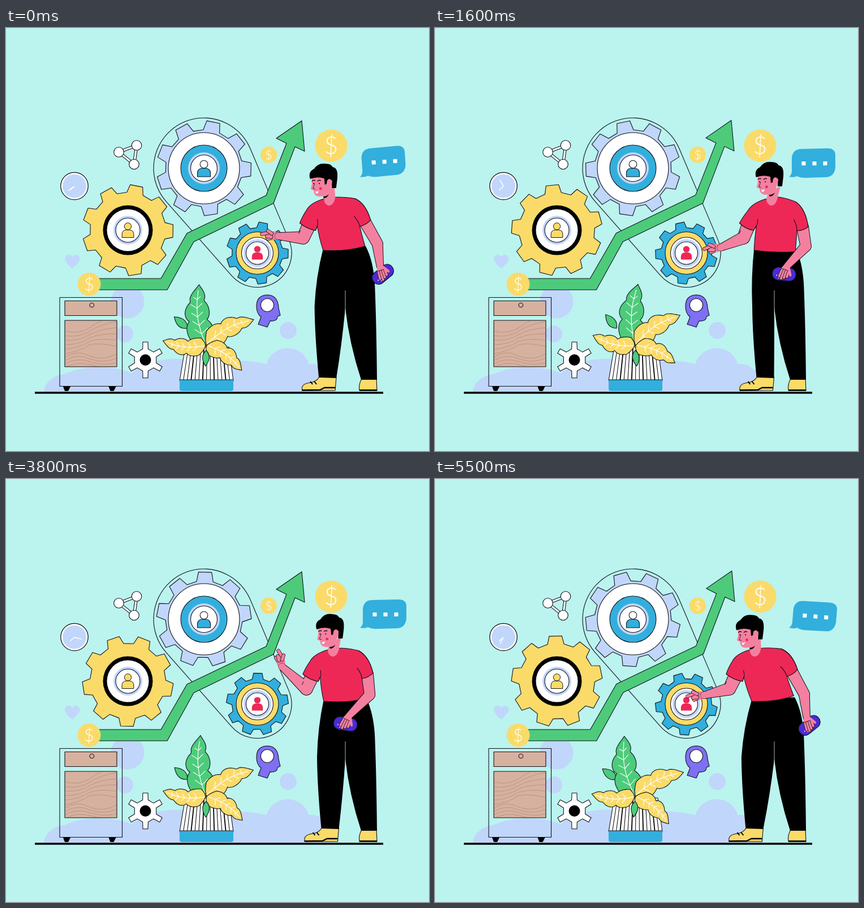
An HTML page with a canvas that plays this animation: 748 px wide and 748 px high, repeating every 5.6 s.

```html
<!DOCTYPE html>
<html lang="en">
<head>
<meta charset="utf-8">
<title>Growth and gears</title>
<style>
html, body { margin: 0; width: 100%; height: 100%; overflow: hidden; background: #bbf3ef; }
canvas { display: block; width: 748px; height: 748px; }
</style>
</head>
<body>
<canvas id="stage" width="748" height="748"></canvas>
<script>
const ctx = document.getElementById('stage').getContext('2d');
const TAU = Math.PI * 2, DEG = Math.PI / 180, LOOP = 5600, STEP = 100, SPIN = .0605;
const BG = '#bbf3ef', INK = '#10131a', LILAC = '#c1d6fb', BLUE = '#32afdd', YELLOW = '#fadb69',
  GREEN = '#4dcb7b', RED = '#ee2856', SKIN = '#f4809f', WOOD = '#d7b19f', GRAIN = '#b48c7c',
  VIOLET = '#7f6ff3', BALL = '#4b2bd6';

// Motion rules
const swayAt = t => Math.sin((t - 430) / 1000);
const leanAt = t => 8 + 12 * swayAt(t) + 4 * Math.cos(TAU * (t - 1600) / 2800);
const plateau = (t, mid, width) => Math.exp(-(((t - mid) / width) ** 4));
const raiseAt = t => plateau(t, 366, 369) + plateau(t, 3684, 1520);

function paint(fill, stroke, width = 1.1) {
  if (fill) { ctx.fillStyle = fill; ctx.fill(); }
  if (stroke) { ctx.strokeStyle = stroke; ctx.lineWidth = width; ctx.stroke(); }
}
function disc(x, y, r, fill, stroke, width) {
  ctx.beginPath(); ctx.arc(x, y, r, 0, TAU); paint(fill, stroke, width);
}
function oval(x, y, rx, ry, fill) {
  ctx.beginPath(); ctx.ellipse(x, y, rx, ry, 0, 0, TAU); paint(fill);
}
function box(x, y, w, h, fill, stroke, r = 0) {
  ctx.beginPath(); ctx.roundRect(x, y, w, h, r); paint(fill, stroke);
}
// Each item is a point [x, y] or a curve [cx, cy, x, y].
function trace(items, map = (x, y) => [x, y], close = true) {
  ctx.beginPath();
  items.forEach((p, i) => {
    if (!i) ctx.moveTo(...map(p[0], p[1]));
    else if (p.length === 2) ctx.lineTo(...map(p[0], p[1]));
    else ctx.quadraticCurveTo(...map(p[0], p[1]), ...map(p[2], p[3]));
  });
  if (close) ctx.closePath();
}
function line(items, color, width, map) { trace(items, map, false); paint(null, color, width); }
function at(x, y, turn, scale, draw) {
  ctx.save(); ctx.translate(x, y); ctx.rotate(turn * DEG); ctx.scale(scale, scale); draw(); ctx.restore();
}
// Outline around two circles.
function hull(x1, y1, r1, x2, y2, r2) {
  const a = Math.atan2(y2 - y1, x2 - x1), b = Math.acos((r1 - r2) / Math.hypot(x2 - x1, y2 - y1));
  ctx.beginPath();
  ctx.arc(x1, y1, r1, a + b, a + TAU - b);
  ctx.arc(x2, y2, r2, a - b, a + b);
  ctx.closePath();
}
function limb(a, ra, b, rb, c, rc) {
  for (const [grow, color] of [[.6, INK], [-.4, SKIN]]) {
    hull(...a, ra + grow, ...b, rb + grow); paint(color);
    hull(...b, rb + grow, ...c, rc + grow); paint(color);
  }
}
function finger(pts, w = 5) { line(pts, INK, w + 1.5); line(pts, SKIN, w); }

function gear(x, y, r, root, teeth, turn, fill, top = 8, base = 12.5) {
  ctx.beginPath();
  for (let i = 0; i < teeth; i++) {
    for (const [off, rad] of [[-base, root], [-top, r], [top, r], [base, root]]) {
      const a = (turn + i * 360 / teeth + off) * DEG;
      ctx.lineTo(x + rad * Math.sin(a), y - rad * Math.cos(a));
    }
  }
  ctx.closePath(); paint(fill, INK);
}
function person(x, y, s, fill, head, stroke) {
  at(x, y, 0, s, () => {
    box(-11.5, 0, 23, 15, fill, stroke, [8, 8, 0, 0]);
    disc(0, -7, 6.8, head, stroke);
  });
}
function dollar(x, y, r) {
  disc(x, y, r, YELLOW);
  ctx.font = `300 ${r * 1.5}px Lato, "Open Sans", sans-serif`;
  ctx.fillStyle = '#fff'; ctx.textAlign = 'center';
  const m = ctx.measureText('$');
  ctx.fillText('$', x, y + (m.actualBoundingBoxAscent - m.actualBoundingBoxDescent) / 2);
}

function backdrop() {
  ctx.fillStyle = BG; ctx.fillRect(0, 0, 748, 748);
  disc(215, 484, 29.5, LILAC); disc(210, 541, 15, LILAC); disc(499, 535, 15, LILAC);
  disc(111, 408, 7, LILAC); disc(123.5, 408, 7, LILAC);
  trace([[105, 411], [117, 407], [130, 411], [126, 418, 117, 425], [108, 419, 105, 411]]); paint(LILAC);
  const hump = (x, rx, ry) => {
    ctx.beginPath(); ctx.ellipse(x, 644, rx, ry, 0, Math.PI, TAU); paint(LILAC);
  };
  hump(112, 45, 33); hump(165, 90, 44); hump(300, 95, 59); hump(405, 120, 56); hump(540, 40, 50);
  disc(498, 605, 39, LILAC);
  line([[51, 645], [667, 645]], '#000', 3.4);
}

function gears(t) {
  const turn = t * SPIN;
  hull(350, 248, 89, 444.5, 398, 60.5); paint(null, INK);

  gear(350, 248, 84, 68, 9, 11.5 + turn, LILAC);
  disc(350, 248, 63, '#fff', INK);
  disc(350, 248, 41, BLUE, INK);
  disc(350, 248, 28, LILAC);
  disc(350, 248, 23.5, '#fff', INK);
  person(350, 248, 1, BLUE, '#fff', INK);

  gear(215.5, 357.5, 80.5, 67, 9, 11 - turn, YELLOW);
  disc(215.5, 357.5, 44, '#000');
  disc(215.5, 357.5, 37, '#fff');
  disc(215.5, 357.5, 25.5, LILAC);
  disc(215.5, 357.5, 21.5, '#fff', INK);
  person(215.5, 357, .9, YELLOW, YELLOW, INK);

  gear(444.5, 398, 55, 45, 9, 11 + turn, BLUE);
  disc(444.5, 398, 37.5, YELLOW, INK);
  disc(444.5, 398, 28, '#fff', INK);
  disc(444.5, 398, 24.5, LILAC);
  disc(444.5, 398, 20, '#fff', INK);
  person(444.5, 397, .84, RED, RED);
}

function arrow(t) {
  const k = 1 + .0215 * Math.sin(Math.PI * t / 2000) ** 4;
  trace([[150, 443], [274, 443], [320, 363], [460, 296], [496, 204], [478, 195], [523, 164], [528, 218],
    [511, 210], [473, 310], [332, 378], [285, 463], [150, 463]],
  (x, y) => [165 + (x - 165) * k, y > 440 ? y : 453 + (y - 453) * k]);
  paint(GREEN, INK);
}

function icons(t) {
  dollar(147, 453, 20.5); dollar(464.5, 224, 14.5); dollar(575, 208, 28.5);

  const nodes = [[199.5, 219.5], [231, 207.5], [226.5, 241]];
  for (const [w, c] of [[5.4, INK], [3.2, '#fff']]) { trace(nodes); paint(null, c, w); }
  nodes.forEach(n => disc(...n, 8.8, '#fff', INK));

  disc(121, 279.5, 24.2, '#fff', INK, 1.3);
  disc(121, 279.5, 20.8, LILAC);
  const hand = (deg, len) => line([[121, 280],
    [121 + len * Math.sin(deg * DEG), 280 - len * Math.cos(deg * DEG)]], '#fff', 1.6);
  hand(230, 10); hand(235 + t * SPIN, 13);

  gear(246.5, 587, 32, 20, 6, 0, '#fff', 8, 14);
  disc(246.5, 587, 10, '#000');

  trace([[446, 524], [451, 511], [443, 505, 443, 492], [443, 472, 463, 472], [481, 473, 482, 495], [485, 508],
    [480, 510], [480, 519, 467, 518], [462, 529]]);
  paint(VIOLET, INK);
  disc(462, 490, 11.5, '#fff', INK);
}

function cabinet() {
  box(95, 476.5, 110.5, 157, null, INK);
  box(104, 482.5, 92, 26, WOOD, INK);
  disc(151.8, 490, 3.8, null, INK);
  box(104, 517, 92, 82, WOOD, INK);
  ctx.save();
  ctx.beginPath(); ctx.rect(105, 518, 90, 80); ctx.clip();
  for (let i = 0; i < 6; i++) {
    line([[104, 536 + i * 8], [130, 542 + i * 6, 148, 530 + i * 6], [166, 516 + i * 8, 196, 508 + i * 11]], GRAIN, .8);
    if (i < 4) line([[104, 582 + i * 6], [126, 568 + i * 7, 148, 580 + i * 5], [172, 590 + i * 4, 196, 576 + i * 8]], GRAIN, .8);
  }
  ctx.restore();
  for (const x of [101, 181.5]) {
    trace([[x, 634], [x + 13, 634], [x + 9, 642], [x + 3, 642]]); paint('#000');
  }
}

// A bowed leaf with three scalloped lobes, growing from (x, y).
function leaf(x, y, turn, len, w, fill) {
  const axis = u => -.085 * len * Math.sin(Math.PI * u);
  const half = u => w * (1 - u ** 4) * Math.sqrt(Math.min(1, u * 8)) *
    (.6 + .4 * Math.sqrt(Math.abs(Math.sin(Math.PI * u * (1.93 + 1.07 * u)))));
  at(x, y, turn, 1, () => {
    ctx.beginPath();
    for (let i = 0; i <= 80; i++) {
      const u = 1 - Math.abs(i - 40) / 40, s = i < 40 ? -1 : 1;
      const side = 1 - u;
      ctx.lineTo(axis(side) * 0 + axis(u) + s * half(u), -len * u);
    }
    ctx.closePath(); paint(fill, INK);
    ctx.beginPath();
    for (let u = .03; u < .92; u += .08) ctx.lineTo(axis(u), -len * u);
    paint(null, '#fff', 1.2);
    for (let u = .2; u < .8; u += .14) {
      const c = axis(u), y0 = -len * u, d = half(u) * .5;
      line([[c - d, y0 - d * .8], [c, y0], [c + d, y0 - d * .8]], '#fff', 1.1);
    }
  });
}
function sprout(x, y, turn, len, w) {
  at(x, y, turn, 1, () => {
    trace([[0, 0], [-w * 1.3, -len * .4, 0, -len], [w * 1.3, -len * .4, 0, 0]]);
    paint(GREEN, INK);
  });
}

function plant(t) {
  const sway = swayAt(t);
  trace([[317, 564], [394, 564], [402, 624], [307, 624]]); paint('#fff', INK);
  for (let i = 1; i < 14; i++) {
    line([[317 + i * 5.5, 565], [307 + i * 6.8, 622]], '#000', i % 3 ? 1 : 1.8);
  }
  box(307, 622, 95, 20, BLUE, null, [0, 0, 4, 4]);
  line([[307, 622], [402, 622]], INK, 1);
  sprout(321, 531, -46 + 8 * sway, 31, 11);
  leaf(354, 562, -3.7 + 6.9 * sway, 109, 24, GREEN);
  leaf(354, 560, 60.5 - 4 * sway, 95, 19, YELLOW);
  leaf(355, 561, 122 - 8.5 * sway, 76, 16, YELLOW);
  leaf(353, 562, -81 + 5.5 * sway, 76, 16, YELLOW);
  sprout(354, 570, 180 - 6 * sway, 28, 9);
}

function bubble(t) {
  let size = 1, turn = 0;
  if (t < 1862) turn = 10 * Math.sin(TAU * (t - 35) / 522);
  else if (t > 5019) turn = -10 * Math.sin(TAU * (t - 5019) / 522);
  if (t > 1900 && t < 3050) size = Math.max(0, 1 - (t - 1900) / 450);
  else if (t >= 3050 && t < 3600) size = .03 + .97 * (t - 3050) / 550;
  else if (t >= 3600 && t < 3800) size = 1 + .06 * Math.sin(Math.PI * (t - 3600) / 200);
  if (!size) return;
  at(628, 263, turn, size, () => {
    trace([[3, -34], [5, -49, 20, -49], [66, -50], [81, -50, 80, -36], [80, -16],
      [78, 0, 64, 1], [26, 2], [18, 2, 12, -1], [6, 2, -2, 0], [4, -4, 3, -14]]);
    paint(BLUE);
    ctx.fillStyle = '#fff';
    for (const x of [24, 43, 62]) ctx.fillRect(x - 3.5, -27, 7, 7);
  });
}

function trousers(lean, k) {
  const step = (x, y) => [x + k * Math.min(1, Math.max(0, (y - 390) / 80)), y];
  const shoe = (x, map) => {
    trace([[x + 31, 617], [x + 61, 617], [x + 59, 641], [x + 1, 641], [x - 2, 631, x + 10, 628],
      [x + 25, 627, x + 31, 617]], map);
    paint(YELLOW, INK);
  };
  shoe(526, step);
  line([[526, 640.5], [558, 640], [566, 636], [585, 636]], '#000', 2.4, step);
  for (const x of [541, 548]) line([[x, 625], [x + 4, 630]], '#000', 2, step);
  trace([[629, 620], [655, 620], [656, 641], [625, 641], [623, 631, 629, 620]]); paint(YELLOW, INK);
  line([[625, 640.5], [656, 640.5]], '#000', 2.6);

  trace([[561 + lean * .14, 390], [550 + k * .7, 440, 548.5 + k, 492], [549 + k, 545, 556 + k, 618],
    [587 + k, 619], [595 + k * .4, 560, 600, 495], [607, 558, 628, 622], [656, 622], [655, 520, 652, 450],
    [649, 410, 636, 386]]);
  paint('#000');
  line([[600, 464], [600, 508]], '#b9c4c6', .9);
}

function pointingArm(lean, raise, shoulder) {
  const elbow = [526 + lean * .85, 371], wrist = [482 + lean, 390 - 58 * raise];
  at(...wrist, 175 + 82 * raise ** 2, 1, () => {
    ctx.lineCap = 'round';
    finger([[8, 2], [20, 3], [29, 0]]);
    finger([[9, -4], [18, -7]]);
    oval(9, 0, 11, 7.5, SKIN);
    finger([[12, -3], [20, -3], [15, -1]]);
    finger([[12, 3], [19, 7]]);
    ctx.lineCap = 'butt';
  });
  limb(shoulder, 12, elbow, 11, wrist, 6);
  disc(...wrist, 6.2, SKIN);
  line([[elbow[0] - 8, elbow[1] - 7], [elbow[0] - 5, elbow[1] - 13]], INK, 1);
}

// The hanging arm swings like a pendulum and carries the ball.
function hangingArm(t, lean, shoulder) {
  const reach = 83, x = 623 + .7 * lean + 42 * Math.cos((t - 5900) / 1000);
  const dx = x - shoulder[0], y = 343 + Math.sqrt(reach ** 2 - dx ** 2), dir = -Math.asin(dx / reach) / DEG;
  const elbow = [(x + shoulder[0]) / 2 + 14 - dx * .2, (y + shoulder[1]) / 2 - 1];
  at(x + dx / reach * 15, y + 14, -18 - .8 * dx, 1, () => {
    box(-21, -11.5, 42, 23, BALL, INK, 11);
    line([[3, -11], [-1, 0, 3, 11]], '#3417a8', 1);
    for (const [a, b] of [[-13, 3], [-9, 7], [-8, 1]]) disc(a, b, 1, '#fff');
  });
  limb(shoulder, 10.5, elbow, 9.5, [x, y], 6);
  at(x, y, dir, 1, () => {
    oval(0, 8, 8, 11, SKIN);
    ctx.lineCap = 'round';
    for (let i = 0; i < 4; i++) finger([[-6 + i * 4, 9], [-7 + i * 4.4, 24 - Math.abs(i - 1) * 3]], 4);
    line([[6, 5], [11, 13]], SKIN, 4.5);
    ctx.lineCap = 'butt';
  });
}

function head() {
  trace([[561, 298], [567, 298, 571, 294], [568, 301, 562, 301]]); paint('#000');
  trace([[541, 260], [541, 276], [539, 285], [544, 287], [545, 298, 554, 298],
    [568, 298, 573, 286], [579, 270], [574, 258]]);
  paint(SKIN);
  trace([[538, 267], [534, 254, 545, 249], [552, 238, 566, 240], [575, 240, 578, 246], [588, 247, 586, 267],
    [584, 283], [576, 283], [577, 270], [570, 265, 567, 276], [564, 277], [563, 266], [550, 262, 538, 267]]);
  paint('#000');
  oval(572, 273, 4.5, 6, SKIN);
  for (const x of [541, 551]) {
    line([[x, 271], [x + 3, 268, x + 6, 270]], '#000', 1.2);
    disc(x + 3.2, 275, 1, '#000');
  }
  line([[546, 275], [543, 284], [547, 285]], INK, .8);
  disc(556.5, 284, 2.4, RED);
  trace([[547, 289], [550, 290, 553, 288], [552, 293, 549, 293]]); paint('#fff');
}

function man(t) {
  const lean = leanAt(t), headX = 2 + 1.33 * leanAt(t - 250);
  // The torso shifts sideways while its far shoulder drops.
  const body = (x, y) => {
    const far = Math.max(0, (x - 590) / 55);
    return [x + lean * (1 - ((y - 300) / 100) ** 2 - .2 * far), y + lean * .5 * far];
  };

  trousers(lean, .65 * lean - 2.5);
  pointingArm(lean, raiseAt(t), body(537, 347));

  trace([[563, 302], [539, 309, 532, 322], [524, 334, 520, 345], [532, 355, 548, 358], [551, 350],
    [554, 372, 561, 393], [600, 396, 635, 386], [629, 365, 626, 351], [637, 349, 645, 340],
    [637, 311, 618, 302], [604, 299, 586, 299]], body);
  paint(RED, INK);
  line([[548, 358], [552, 347], [551, 338]], INK, 1, body);

  trace([[560 + headX, 290], [581 + headX, 280], [583 + lean, 299], [580 + lean, 314, 571 + lean, 314],
    [563 + lean, 312, 563 + lean, 302]]);
  paint(SKIN);
  at(headX, -headX * .1, 0, 1, head);

  hangingArm(t, lean, body(635, 343));
  trace([[615, 303], [637, 311, 645, 340], [637, 349, 626, 351], [621, 338, 615, 333]], body); paint(RED);
  line([[618, 302], [637, 311, 645, 340], [637, 349, 626, 351], [624, 342, 616, 333]], INK, 1.1, body);
}

function draw(t) {
  ctx.lineJoin = 'round';
  backdrop();
  gears(t);
  arrow(t);
  icons(t);
  cabinet();
  plant(t);
  bubble(t);
  man(t);
}

const start = performance.now();
function tick() {
  const t = (performance.now() - start) % LOOP;
  draw(Math.floor(t / STEP) * STEP);
  requestAnimationFrame(tick);
}
tick();
</script>
</body>
</html>
```
